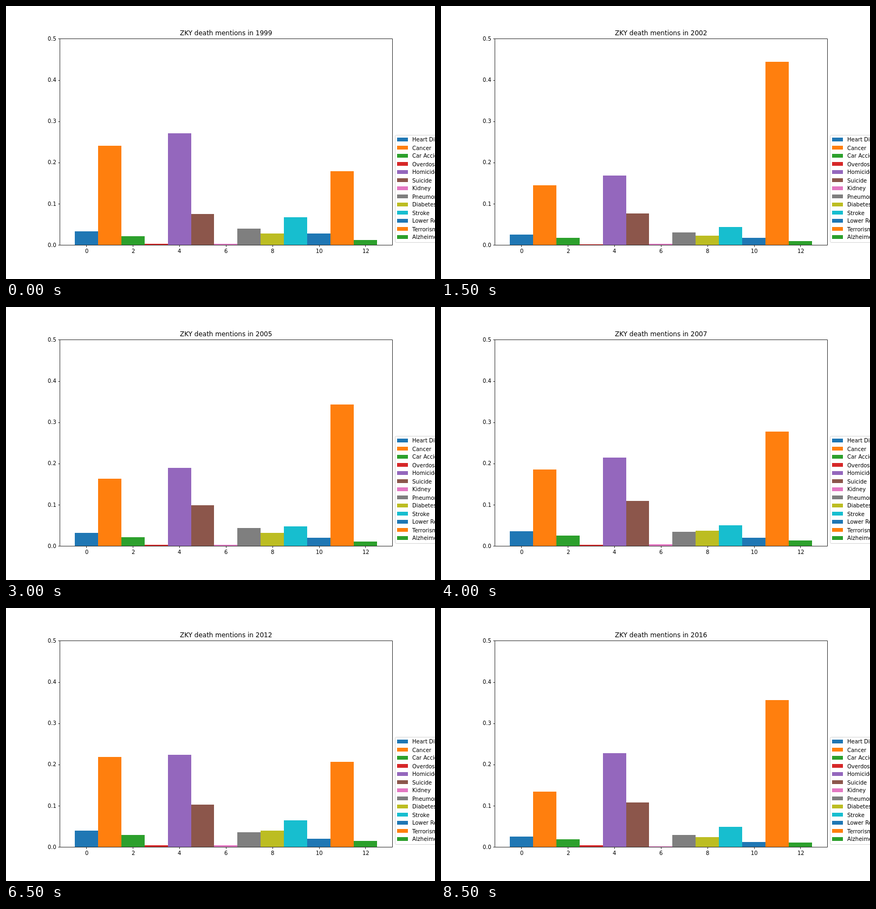
These frames come from a looping animation (792x504 px, 9000 ms). An HTML page:

```html
<!DOCTYPE html>
<html lang="en">
<head>
<meta charset="utf-8">
<title>Death mentions by year</title>
<style>
  html, body { margin: 0; width: 100%; height: 100%; overflow: hidden; background: #fff; }
  svg { display: block; width: 792px; height: 504px; }
  text { font: 10px "DejaVu Sans", sans-serif; fill: #000; white-space: pre; }
  .title { font-size: 12px; }
  .axis { stroke: #000; stroke-width: .8; fill: none; }
</style>
</head>
<body>
<svg id="chart" viewBox="0 0 792 504"></svg>
<script>
const STEP = 500, FIRST = 1999, YEARS = 18;
const BASE = 441, LEFT = 99, RIGHT = 712.8, TOP = 60.48;
const UNIT = (RIGHT - LEFT) / 14.3;
const FULL = 2 * (BASE - TOP);
const COLORS = ['#1f77b4', '#ff7f0e', '#2ca02c', '#d62728', '#9467bd',
                '#8c564b', '#e377c2', '#7f7f7f', '#bcbd22', '#17becf'];

// All bars add up to FULL. The leading causes have a height at each key year;
// the others split what is left by a share given at the start, middle and end.
const KEY_YEARS = [1999, 2001, 2004, 2007, 2009, 2012, 2016];
const CAUSES = [
  { name: 'Heart Disease', share: [.17, .2, .17] },
  { name: 'Cancer', heights: [183, 107, 115, 141, 166, 166, 102] },
  { name: 'Car Accidents', share: [.11, .14, .125] },
  { name: 'Overdose', share: [.013, .013, .025] },
  { name: 'Homicide', heights: [206, 124, 135, 163, 133, 170, 173] },
  { name: 'Suicide', heights: [57, 52, 71, 83, 76, 78, 82] },
  { name: 'Kidney', share: [.013, .02, .012] },
  { name: 'Pneumonia', heights: [30, 17, 36, 26, 82, 27, 22] },
  { name: 'Diabetes', share: [.14, .21, .16] },
  { name: 'Stroke', share: [.34, .27, .33] },
  { name: 'Lower Respiratory', share: [.14, .11, .08] },
  { name: 'Terrorism', heights: [136, 364, 286, 211, 161, 157, 271] },
  { name: 'Alzheimer\'s', share: [.06, .07, .07] }
];

const chart = document.getElementById('chart');

function add(tag, attrs, content = '') {
  const node = document.createElementNS('http://www.w3.org/2000/svg', tag);
  for (const name in attrs) node.setAttribute(name, attrs[name]);
  node.textContent = content;
  return chart.appendChild(node);
}

// Starts the text on a whole pixel; align is 0 for left, .5 for centre, 1 for right.
function setText(node, content, x, align) {
  node.textContent = content;
  const offset = align && node.getComputedTextLength() * align - .5;
  node.setAttribute('x', Math.round(x - offset));
}

function label(x, y, content, align = 0) {
  setText(add('text', { y }), content, x, align);
}

const axisPath = d => add('path', { class: 'axis', d });
const snap = v => Math.round(v) + .5;
const dataX = v => LEFT + (v + 1.15) * UNIT;
const color = i => COLORS[i % COLORS.length];

function interpolate(points, position) {
  const i = Math.min(Math.floor(position), points.length - 2);
  return points[i] + (points[i + 1] - points[i]) * (position - i);
}

function heightsIn(year) {
  const next = Math.max(1, KEY_YEARS.findIndex(key => key >= year));
  const from = KEY_YEARS[next - 1];
  const keyPosition = next - 1 + (year - from) / (KEY_YEARS[next] - from);
  const sharePosition = 2 * (year - FIRST) / (YEARS - 1);

  const leading = CAUSES.map(c => c.heights ? interpolate(c.heights, keyPosition) : 0);
  const rest = FULL - leading.reduce((sum, height) => sum + height);
  return CAUSES.map((c, i) =>
    Math.round(c.share ? rest * interpolate(c.share, sharePosition) : leading[i]));
}

const bars = CAUSES.map((_, i) => {
  const x = Math.round(dataX(i - .5));
  return add('rect', { x, width: Math.round(dataX(i + .5)) - x, fill: color(i) });
});

for (let v = 0; v <= 12; v += 2) {
  const x = dataX(v);
  axisPath(`M${snap(x)} 441.5V445`);
  label(x, 456, v, .5);
}
for (let i = 0; i <= 5; i++) {
  const y = BASE - (BASE - TOP) * i / 5;
  axisPath(`M99.5 ${snap(y)}H96.5`);
  label(92, Math.round(y + 3.7), (i / 10).toFixed(1), 1);
}
axisPath('M99.5 60.5H713.5V441.5H99.5Z');

const title = add('text', { class: 'title', y: 54 });

add('rect', { x: 718.5, y: 238.5, width: 130, height: 198, rx: 2,
              fill: '#fff', stroke: '#ccc', 'stroke-opacity': .8 });
CAUSES.forEach(({ name }, i) => {
  const y = 243 + 15 * i;
  add('rect', { x: 722, y, width: 20, height: 7, fill: color(i) });
  // Baselines fall on half pixels and round to the even one.
  label(750, y + 7 + i % 2, name);
});

let shownYear;
function draw(now) {
  const year = FIRST + Math.floor(now / STEP) % YEARS;
  if (year === shownYear) return;
  shownYear = year;
  setText(title, `ZKY death mentions in ${year}`, (LEFT + RIGHT) / 2, .5);
  heightsIn(year).forEach((height, i) => {
    bars[i].setAttribute('y', BASE - height);
    bars[i].setAttribute('height', height);
  });
}

const start = performance.now();
function tick() {
  draw(performance.now() - start);
  requestAnimationFrame(tick);
}
tick();
</script>
</body>
</html>
```
